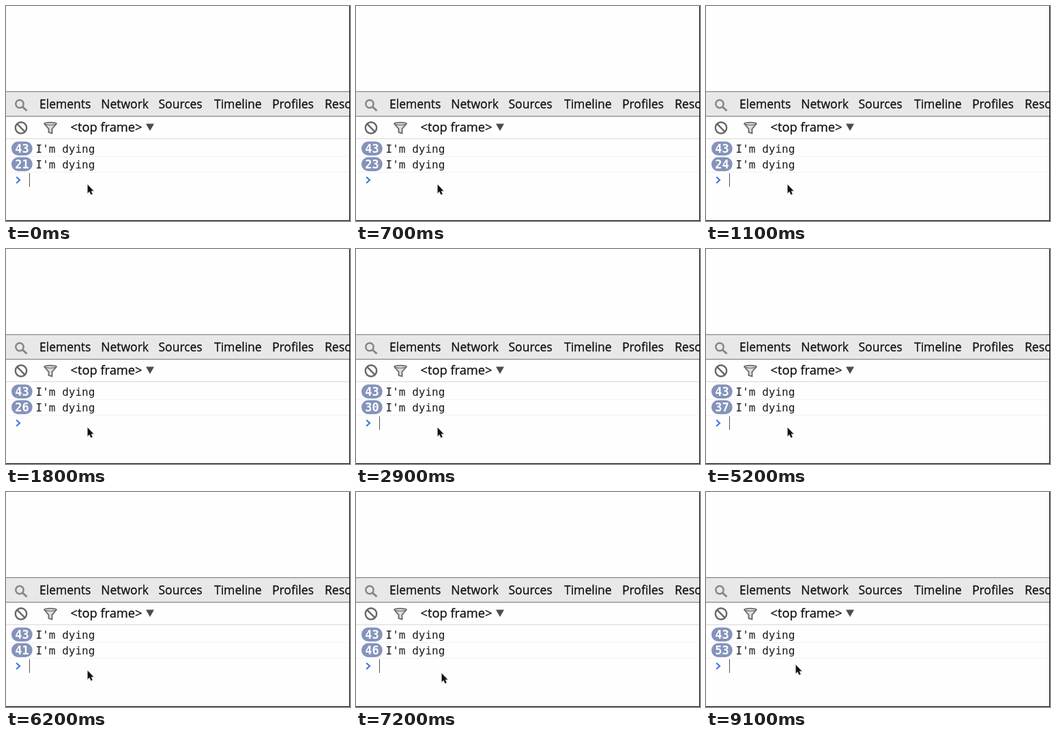
Animation of 504 by 315 pixels, one loop 9200 ms. Source, as an HTML page:

```html
<!DOCTYPE html>
<html lang="en">
<head>
<meta charset="utf-8">
<title>Console counter</title>
<style>
  html, body { margin: 0; width: 100%; height: 100%; overflow: hidden; background: #fefefe; }
  svg { display: block; width: 504px; height: 315px; }
  .ui { font: 17.5px "Open Sans", "Noto Sans", sans-serif; fill: #111; stroke: #111; stroke-width: .3; }
  .frame { font-size: 18.3px; }
  .log { font: 16px "DejaVu Sans Mono", monospace; fill: #181818; }
  .badge { font: bold 17px "DejaVu Sans Mono", monospace; fill: #fff; text-anchor: middle; }
  .icon { fill: none; stroke: #666; stroke-width: 2.4; }
</style>
</head>
<body>
<svg viewBox="0 0 504 315">
  <rect width="504" height="315" fill="#fefefe"/>
  <rect y="126" width="504" height="35" fill="#e8e8e8"/>
  <path d="M0 125.5H504M0 161.5H504" stroke="#757575"/>
  <path d="M0 194.5H504" stroke="#d8d8d8"/>
  <path d="M0 220.5H504M0 243.5H504" stroke="#f2f2f2"/>

  <g class="ui">
    <text x="49" y="149.5">Elements</text>
    <text x="139.3" y="149.5">Network</text>
    <text x="223.5" y="149.5">Sources</text>
    <text x="305" y="149.5">Timeline</text>
    <text x="390" y="149.5">Profiles</text>
    <text x="467" y="149.5">Resources</text>
    <text x="94.5" y="183.5" class="frame">&lt;top frame&gt;</text>
  </g>
  <path d="M205 172.5H217L211 183Z" fill="#4c4c4c"/>

  <g class="icon">
    <g stroke="#858585"><circle cx="20" cy="143.5" r="5.7"/><path d="M24 147.5L30.5 153.5" stroke-width="3"/></g>
    <circle cx="22" cy="178.5" r="8.2"/>
    <path d="M16.2 172.7L27.8 184.3"/>
    <path d="M56 172.5C56 170 74 170 74 172.5L67.5 180V186.5L62.5 185V180Z" fill="#dcdcdc" stroke-width="1.8"/>
    <path d="M57 173C61 175 69 175 73 173" stroke-width="1.2"/>
    <path d="M15.2 250.5L20 255L15.2 259.5" stroke="#4679dc" stroke-width="2.2"/>
  </g>

  <g fill="#8593bb">
    <rect x="8" y="198.5" width="30.7" height="20.5" rx="10"/>
    <rect x="8" y="221.5" width="30.7" height="20.5" rx="10"/>
  </g>
  <text class="badge" x="23.4" y="215">43</text>
  <text class="badge" x="23.4" y="238" id="count">21</text>
  <text class="log" x="43.6" y="215">I'm dying</text>
  <text class="log" x="43.6" y="238">I'm dying</text>

  <path id="caret" d="M34.5 245V265" stroke="#555"/>
  <path id="mouse" d="M0 0V12L2.6 9.5L4.8 14.3L6.8 13.4L4.8 8.8H8.4Z" fill="#111" stroke="#bbb" stroke-width="1.2" paint-order="stroke"/>
  <path d="M503.5 0V314.5H0" fill="none" stroke="#000"/>
</svg>
<script>
  const LOOP = 9200;
  const FIRST_COUNT = 21;
  // Times in tenths of a second
  const countTicks = [3, 6, 10, 14, 17, 20, 23, 25, 28, 31, 36, 38, 42, 44, 47, 49,
    53, 55, 58, 61, 64, 66, 68, 70, 72, 74, 76, 80, 82, 85, 87, 91];
  const caretToggles = [6, 11, 16, 21, 25, 29, 36, 42, 47, 52, 58, 62, 67, 72, 80, 83];
  const mouseMoves = [
    { start: 65, end: 68, by: [6, 4] },
    { start: 84, end: 87, by: [6, -12.5] }
  ];

  const [count, caret, mouse] = ["count", "caret", "mouse"].map(id => document.getElementById(id));
  const passed = (times, now) => times.filter(t => t <= now).length;

  function mousePosition(now) {
    let [x, y] = [119.7, 262];
    for (const { start, end, by } of mouseMoves) {
      const p = Math.min(1, Math.max(0, (now - start) / (end - start)));
      x += by[0] * p;
      y += by[1] * p;
    }
    return [x, y];
  }

  function draw(time) {
    const now = Math.floor((time % LOOP) / 100);
    count.textContent = FIRST_COUNT + passed(countTicks, now);
    caret.style.opacity = passed(caretToggles, now) % 2 ? 0 : 1;
    mouse.setAttribute("transform", `translate(${mousePosition(now)})`);
  }

  const began = performance.now();
  function tick() {
    draw(performance.now() - began);
    requestAnimationFrame(tick);
  }
  tick();
</script>
</body>
</html>
```
